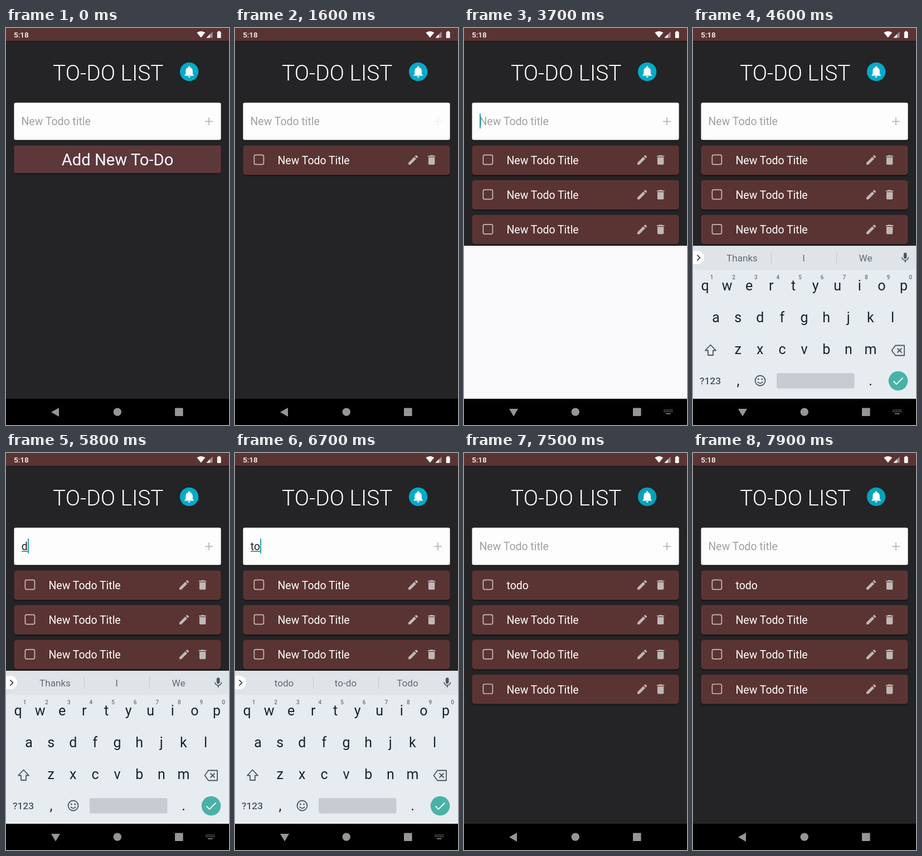
An HTML page that plays this animation: 400 by 711 pixels, repeating every 8000 ms.

```html
<!DOCTYPE html>
<html lang="en">
<head>
<meta charset="utf-8">
<title>To-do list</title>
<style>
  html, body { margin: 0; width: 100%; height: 100%; overflow: hidden; background: #242325; }
  svg { display: block; width: 100vw; height: 100vh; font-family: Roboto, sans-serif; }
  .mid { text-anchor: middle; }
  .line { fill: none; stroke-width: 1.8; }
</style>
</head>
<body>
<svg id="stage" viewBox="0 0 400 711"></svg>
<script>
const LOOP = 8000;
const TEXT = 19.46;
const CARD_STEP = 62.2;
const ADDED = [1550, 2150, 2750];
const SUBMIT = 7200;
const TYPED = [[5700, 'd'], [6250, ''], [6450, 't'], [6600, 'to'], [6750, 'tod'], [6900, 'todo'], [SUBMIT, '']];

const BELL = 'M12 22c1.1 0 2-.9 2-2h-4c0 1.1.89 2 2 2zm6-6v-5c0-3.07-1.64-5.64-4.5-6.32V4c0-.83-.67-1.5-1.5-1.5s-1.5.67-1.5 1.5v.68C7.63 5.36 6 7.92 6 11v5l-2 2v1h16v-1l-2-2z';
const PENCIL = 'M3 17.25V21h3.75L17.81 9.94l-3.75-3.75L3 17.25zM20.71 7.04c.39-.39.39-1.02 0-1.41l-2.34-2.34c-.39-.39-1.02-.39-1.41 0l-1.83 1.83 3.75 3.75 1.83-1.83z';
const TRASH = 'M6 19c0 1.1.9 2 2 2h8c1.1 0 2-.9 2-2V7H6v12zM19 4h-3.5l-1-1h-5l-1 1H5v2h14V4z';
const MIC = 'M12 14c1.66 0 3-1.34 3-3V5c0-1.66-1.34-3-3-3S9 3.34 9 5v6c0 1.66 1.34 3 3 3zm5.3-3c0 3-2.54 5.1-5.3 5.1S6.7 14 6.7 11H5c0 3.41 2.72 6.23 6 6.72V21h2v-3.28c3.28-.48 6-3.3 6-6.72h-1.7z';

const rect = (x, y, w, h, fill, r = 0, more = '') =>
  `<rect x="${x}" y="${y}" width="${w}" height="${h}" rx="${r}" fill="${fill}" ${more}/>`;
const text = (s, x, y, size, fill, more = '') =>
  `<text x="${x}" y="${y}" font-size="${size}" fill="${fill}" ${more}>${s}</text>`;
const mid = (s, x, y, size, fill, more = '') => text(s, x, y, size, fill, `class="mid" ${more}`);
const icon = (d, x, y, scale, fill) =>
  `<path d="${d}" fill="${fill}" transform="translate(${x} ${y}) scale(${scale})"/>`;
const line = (d, color, more = '') => `<path class="line" d="${d}" stroke="${color}" ${more}/>`;

// Soft drop shadow made of two faint offset boxes
const shadow = (x, y, w, h) =>
  rect(x - 1, y + 1, w + 2, h + 2, '#000', 6, 'opacity=".14"') + rect(x, y + 1, w, h + .8, '#000', 5, 'opacity=".25"');

const card = i => `<g id="card${i}" transform="translate(0 ${i * CARD_STEP})">
  ${shadow(14.4, 210.4, 371.2, 52.5)}${rect(14.4, 210.4, 371.2, 52.5, '#5a3433', 5)}
  ${rect(34.4, 227.4, 17, 17, 'none', 2.6, 'stroke="#c3baba" stroke-width="1.7"')}
  ${text('New Todo Title', 76.5, 244, TEXT, '#fff', `id="label${i}"`)}
  ${icon(PENCIL, 308.2, 224.9, .95, '#beb8b8')}${icon(TRASH, 341.2, 224.9, .95, '#beb8b8')}
</g>`;

const row = (keys, x, y) =>
  [...keys].map((k, i) => mid(k, x + i * 39.62, y, 25, '#16242c')).join('');

function keyboard() {
  const ink = '#4c575e';
  const digits = [...'1234567890'].map((d, i) =>
    mid(d, 33.5 + i * 39.62, 450, 10, '#66727a', 'font-weight="500"')).join('');
  return rect(0, 390, 400, 274, '#e7ecf0') + rect(0, 390, 400, 43, '#dfe4e8')
    + rect(-12, 399, 32, 24, '#fff', 12) + line('M7.5 406.5l4.8 5-4.8 5', '#2b363c')
    + [140, 257].map(x => rect(x, 400, 1, 23, '#c5cbcf')).join('')
    + [88, 198.5, 309.5].map((x, i) => mid('', x, 418, 17.1, '#626c72', `id="hint${i}"`)).join('')
    + icon(MIC, 369.5, 400.3, .93, ink)
    + digits + row('qwertyuiop', 21.5, 469.5) + row('asdfghjkl', 41, 526.5) + row('zxcvbnm', 80.7, 583.5)
    + line('M31.5 567.5l9.5 10h-5v8.5h-9v-8.5h-5z', ink, 'stroke-linejoin="round"')
    + line('M363 568.5h16v18h-16l-6.5-9zM366.5 573.5l8 8m0-8l-8 8', ink, 'stroke-linejoin="round"')
    + text('?123', 12, 638, 17.4, ink, 'font-weight="500"')
    + mid(',', 81, 640, 25, '#16242c') + mid('.', 318.5, 640, 25, '#16242c')
    + '<circle class="line" cx="120.5" cy="631.5" r="9" stroke="' + ink + '"/>'
    + `<circle cx="117.3" cy="629" r="1.4" fill="${ink}"/><circle cx="123.7" cy="629" r="1.4" fill="${ink}"/>`
    + line('M115.8 633.5q4.7 5.6 9.4 0', ink)
    + rect(150, 618, 139.5, 27.5, '#c6ccd1', 3)
    + '<circle cx="368" cy="632" r="17.3" fill="#49b2a8"/>' + line('M359.5 632.5l5.5 5.5 11.5-11.5', '#fff');
}

function dots() {
  let out = '';
  for (let y = 0; y < 2; y++)
    for (let x = 0; x < 6; x++) out += rect(358.5 + x * 2.8, 683.5 + y * 3, 1.5, 1.6, '#8d8d8d');
  return out + rect(362, 690, 8.5, 1.6, '#8d8d8d');
}

document.getElementById('stage').innerHTML =
  rect(0, 0, 400, 711, '#242325')
  + rect(0, 23, 400, 2, '#000', 0, 'opacity=".22"') + rect(0, 0, 400, 23, '#5a3433')
  + text('5:18', 14, 17, 13.6, '#fff', 'font-weight="500"')
  + '<path d="M349.8 17.3L342.3 8.3q7.5-5.2 15 0z" fill="#fff"/>'
  + '<path d="M370.5 6.5v11h-11z" fill="#fff" opacity=".45"/><path d="M365.7 11.3v6.2h-6.2z" fill="#fff"/>'
  + rect(378.8, 6.7, 6.8, 11.2, '#fff', 1) + rect(380.8, 5.4, 2.8, 2, '#fff')
  + text('TO-DO LIST', 84, 94, 38.9, '#fff', 'font-weight="300"')
  + '<circle id="badge" cx="328.6" cy="78.4" r="16.7"/>' + icon(BELL, 316, 65.6, 1.05, '#fff')
  + shadow(14.4, 133.8, 371.2, 66.6) + rect(14.4, 133.8, 371.2, 66.6, '#fdfdfd', 3)
  + text('New Todo title', 27.5, 174, TEXT, '#a0a0a0', 'id="placeholder"')
  + text('', 27.8, 174, TEXT, '#222', 'id="entry"')
  + rect(28, 175.6, 0, 1.1, '#222', 0, 'id="underline"')
  + rect(28, 153.3, 1.8, 26.5, '#0d9aa2', 0, 'id="caret"')
  + line('M357 167.3h14M364 160.3v14', '#b7b7b7', 'id="plus"')
  + `<g id="button">${shadow(14.4, 210.4, 371.2, 49.3)}${rect(14.4, 210.4, 371.2, 49.3, '#5d383a', 3)}
     ${mid('Add New To-Do', 200, 246.3, 29.2, '#fff')}</g>`
  + [0, 1, 2, 3].map(card).join('')
  + rect(0, 390, 400, 274, '#f9f8fa', 0, 'id="panel"')
  + rect(0, 664, 400, 47, '#000')
  + `<g id="keys">${keyboard()}</g>`
  + '<g fill="#969696"><path id="back"/><circle cx="199.8" cy="687.6" r="7.2"/></g>'
  + rect(303, 680.6, 14.6, 14.4, '#969696', 1)
  + `<g id="switcher">${dots()}</g>`;

const el = {};
document.querySelectorAll('[id]').forEach(n => el[n.id] = n);
const show = (n, on) => n.setAttribute('visibility', on ? 'visible' : 'hidden');
const put = (n, s) => { if (n.textContent !== s) n.textContent = s; };
const ramp = (t, a, b) => Math.min(1, Math.max(0, (t - a) / (b - a)));

function draw(t) {
  const sent = t >= SUBMIT;
  const count = ADDED.filter(a => t >= a).length + sent;
  show(el.button, !count);
  for (let i = 0; i < 4; i++) show(el['card' + i], i < count);
  put(el.label0, sent ? 'todo' : 'New Todo Title');
  el.badge.setAttribute('fill', t < 7300 ? '#02abc8' : '#05a1bb');

  // The plus dims on each tap and recovers
  const dim = Math.max(...ADDED.map(a => ramp(t, a - 150, a - 50) - ramp(t, a + 80, a + 300)));
  el.plus.setAttribute('opacity', 1 - .8 * dim);

  const last = TYPED.filter(([at]) => t >= at).pop();
  const entry = last ? last[1] : '';
  put(el.entry, entry);
  show(el.placeholder, !entry);
  const width = entry ? el.entry.getComputedTextLength() : 0;
  el.underline.setAttribute('width', width);
  el.caret.setAttribute('x', 28 + width);
  const blink = t < 3750 || Math.floor((t - 3750) / 500) % 2 === 0;
  show(el.caret, t >= 3500 && !sent && (blink || t >= 5700));

  const open = t >= 3500 && t < 7300;
  show(el.panel, t >= 3600 && t < 7300);
  show(el.switcher, open);
  el.back.setAttribute('d', open ? 'M81 682h16l-8 13.5z' : 'M95 680v16l-14-8z');

  const rise = 1 - (1 - ramp(t, 3750, 3950)) ** 3;
  const fall = ramp(t, 7330, 7500);
  el.keys.setAttribute('opacity', rise * (1 - fall));
  el.keys.setAttribute('transform', `translate(0 ${55 * (1 - rise + fall)})`);
  const hints = t < 6700 ? ['Thanks', 'I', 'We'] : ['todo', 'to-do', 'Todo'];
  hints.forEach((h, i) => put(el['hint' + i], h));
}

const start = performance.now();
function tick() {
  draw((performance.now() - start) % LOOP);
  requestAnimationFrame(tick);
}
tick();
</script>
</body>
</html>
```
